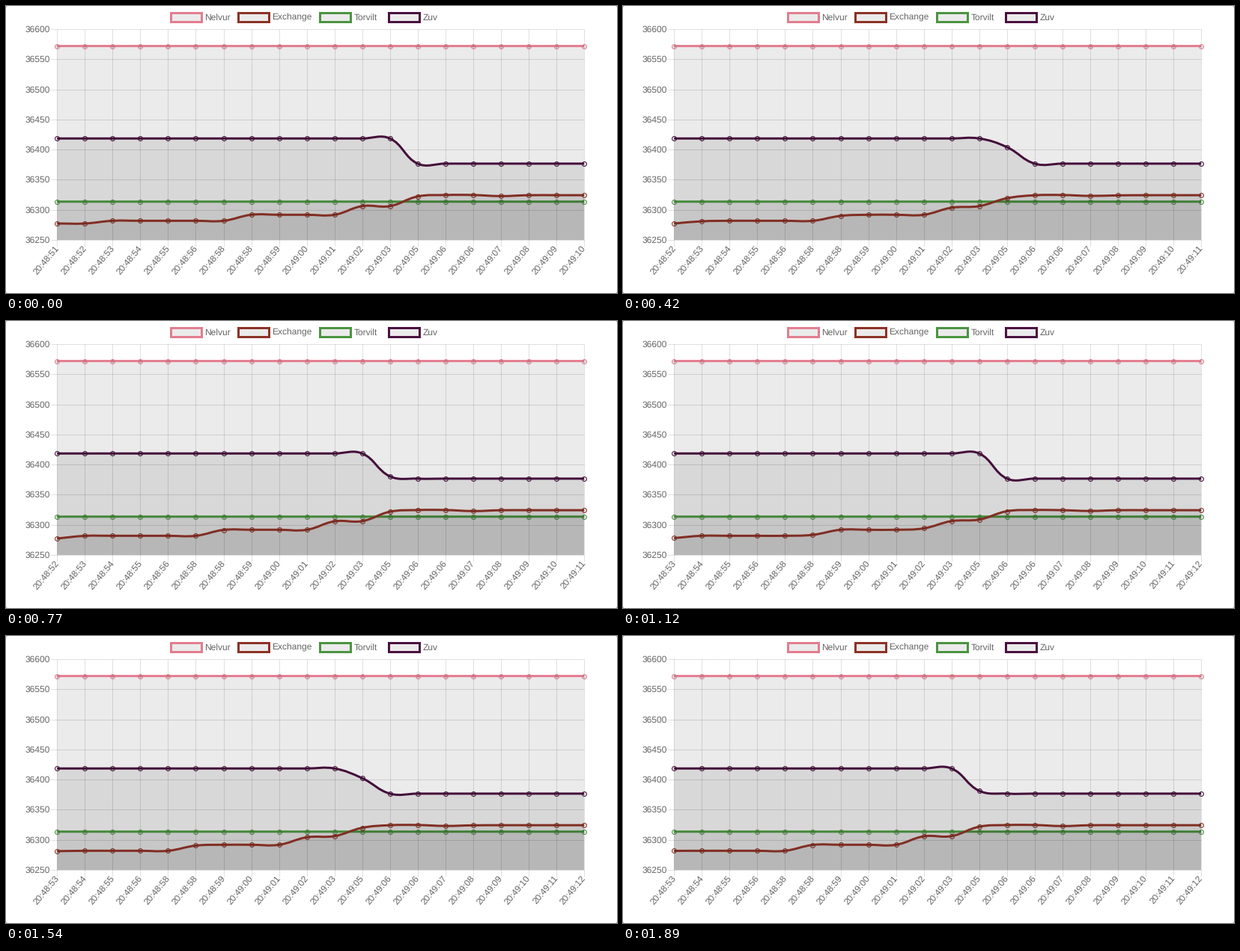
These frames come from a looping animation (816 px wide and 384 px high, 1.96 s). A matplotlib script:

```python
import matplotlib.pyplot as plt
import numpy as np
from matplotlib.animation import FuncAnimation
from matplotlib.patches import FancyBboxPatch, PathPatch, Rectangle
from matplotlib.path import Path

W, H, DPI = 816, 384, 96
PX = 72 / DPI
FRAMES, STEP = 28, 70
LEFT, RIGHT, TOP, BOTTOM = 68.3, 772, 31, 313
N = 20
DURATION = 1000
TENSION = 0.4
SHADE = (0, 0, 0, 0.08)
GRID = (0, 0, 0, 0.12)
INK = "#666666"

plt.rcParams["font.family"] = "Liberation Sans"
plt.rcParams["text.hinting"] = "none"

# Every feed message restarts the easing; some also bring a new value.
UPDATES = (20, 110, 220, 320, 1077, 1200, 1320, 1425, 1560)
TICKS = (20, 1077)
DROPS = (320, 1425)

SECONDS = [51, 52, 53, 54, 55, 56, 58, 58, 59, 60, 61,
           62, 63, 65, 66, 66, 67, 68, 69, 70, 71, 72]
LABELS = [f"20:{48 + s // 60}:{s % 60:02d}" for s in SECONDS]


def steps(*runs):
    return np.concatenate([np.full(n, v, float) for v, n in runs])


# name, colour, legend x, values, times at which the window moves on
SERIES = [
    ("Nelvur", "#e37d8f", 219.5, steps((36572, 22)), TICKS),
    ("Exchange", "#8c3226", 309.5, steps(
        (36277.3, 2), (36281.8, 5), (36291.8, 4), (36306.2, 2), (36322.2, 1),
        (36324.6, 2), (36322.8, 1), (36324.3, 5)), TICKS),
    ("Torvilt", "#4b9440", 418.5, steps((36313.6, 22)), TICKS),
    ("Zuv", "#4a1140", 510.5, steps((36418.5, 13), (36376.7, 9)), DROPS),
]

xs = np.linspace(LEFT, RIGHT, N)


def to_y(v):
    return BOTTOM - (v - 36250) / 350 * (BOTTOM - TOP)


def passed(times, t):
    return sum(s <= t for s in times)


def values(data, starts, t):
    """Ease-out-quart towards the current window, restarted on each update."""
    v = data[:N]
    for u, nxt in zip(UPDATES, UPDATES[1:] + (np.inf,)):
        if u > t:
            break
        k = passed(starts, u)
        goal = data[k:k + N]
        left = 1 - min(1, (min(nxt, t) - u) / DURATION)
        v = goal + (v - goal) * left ** 4
    return v


def spline(ys):
    p = np.column_stack([xs, ys])
    prev = np.vstack([p[:1], p[:-1]])
    nxt = np.vstack([p[1:], p[-1:]])
    a = np.hypot(*(p - prev).T)
    b = np.hypot(*(nxt - p).T)
    span = (nxt - prev) * TENSION / (a + b)[:, None]
    before = p - span * a[:, None]
    after = p + span * b[:, None]
    for c in (before, after):
        c[:, 1] = np.clip(c[:, 1], TOP, BOTTOM)
    curve = np.stack([after[:-1], before[1:], p[1:]], axis=1).reshape(-1, 2)
    verts = np.vstack([p[:1], curve])
    codes = [Path.MOVETO] + [Path.CURVE4] * len(curve)
    area = np.vstack([verts, [(RIGHT, BOTTOM), (LEFT, BOTTOM), p[0]]])
    area_codes = codes + [Path.LINETO, Path.LINETO, Path.CLOSEPOLY]
    return Path(verts, codes), Path(area, area_codes)


fig = plt.figure(figsize=(W / DPI, H / DPI), dpi=DPI, facecolor="#c4c4c4")
ax = fig.add_axes([0, 0, 1, 1])
ax.set_xlim(0, W)
ax.set_ylim(H, 0)
ax.axis("off")
ax.add_patch(FancyBboxPatch((0, 0), W, H, boxstyle="round,pad=0,rounding_size=3",
                            fc="white", ec="none", zorder=0))


def write(x, y, s, **kw):
    return ax.text(x, y, s, size=12 * PX, color=INK, va="baseline", zorder=20, **kw)


def rule(x, y):
    ax.plot(x, y, color=GRID, lw=PX, zorder=1, solid_capstyle="butt")


for x in xs:
    rule([x, x], [TOP, BOTTOM + 8.5])
for v in range(36250, 36601, 50):
    y = to_y(v)
    rule([LEFT - 8, RIGHT], [y, y])
    write(59, y + 3.9, str(v), ha="right")

# Baseline offset that centres the tilted labels on their ticks
ANGLE = 50
dx, dy = 4.2 * np.sin(np.radians(ANGLE)), 4.2 * np.cos(np.radians(ANGLE))
times = [write(x - 0.5 + dx, BOTTOM + 8.4 + dy, "", ha="right", rotation=ANGLE,
               rotation_mode="anchor") for x in xs]

plots = []
for i, (name, color, lx, data, starts) in enumerate(SERIES):
    z = 10 - 2 * i
    ax.add_patch(Rectangle((lx, 8.5), 41, 12, fc=SHADE, ec=color, lw=3 * PX,
                           joinstyle="miter"))
    write(lx + 46, 19, name)
    blank = Path([(0, 0)])
    fill = ax.add_patch(PathPatch(blank, fc=SHADE, ec="none", zorder=z))
    line = ax.add_patch(PathPatch(blank, fc="none", ec=color, lw=3 * PX,
                                  capstyle="butt", zorder=z + 0.5))
    dots, = ax.plot([], [], "o", ms=6 * PX, mew=PX, mfc=(0, 0, 0, 0.1),
                    mec=color, zorder=z + 1, snap=False)
    plots.append((data, starts, fill, line, dots))


def draw(frame):
    t = frame * STEP
    k = passed(TICKS, t)
    for text, s in zip(times, LABELS[k:k + N]):
        text.set_text(s)
    for data, starts, fill, line, dots in plots:
        ys = to_y(values(data, starts, t))
        curve, area = spline(ys)
        line.set_path(curve)
        fill.set_path(area)
        dots.set_data(xs, ys)
    return []


anim = FuncAnimation(fig, draw, frames=FRAMES, interval=STEP, repeat=True,
                     repeat_delay=0)
plt.show()
```
